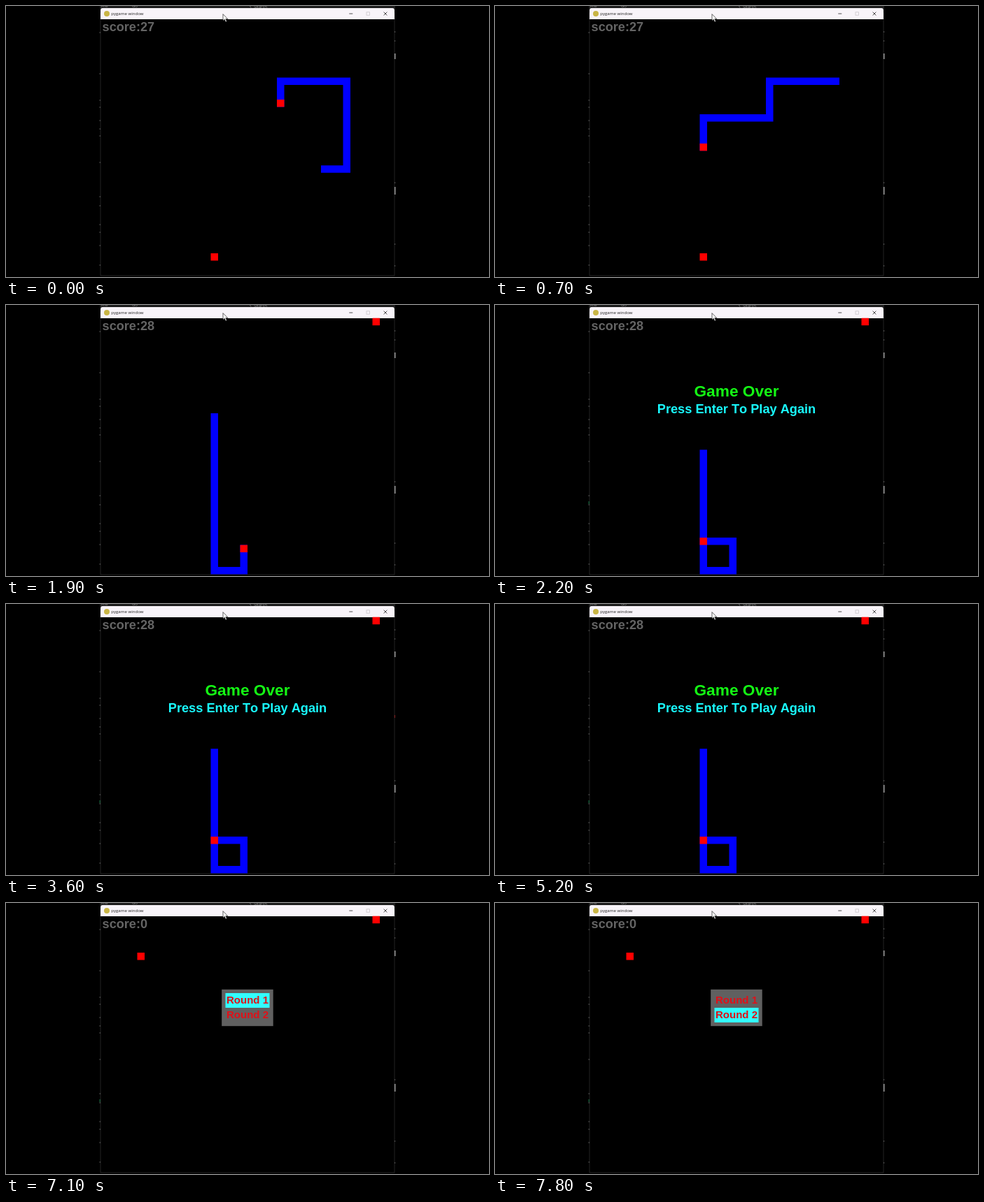
Animation, 690 px wide and 388 px high, one loop 8000 ms. Source, as an HTML page:

```html
<!DOCTYPE html>
<html lang="en">
<head>
<meta charset="utf-8">
<title>pygame window</title>
<style>
html, body { margin: 0; width: 100%; height: 100%; overflow: hidden; background: #000; }
svg { display: block; width: 690px; height: 388px; }
text { font-family: "Liberation Sans", Arial, sans-serif; font-weight: bold; font-kerning: none; }
.ui { font-family: "Open Sans", "Noto Sans", sans-serif; font-weight: normal; }
.mid { text-anchor: middle; }
</style>
</head>
<body>
<svg viewBox="0 0 690 388">
  <rect width="690" height="388"/>
  <rect x="134" width="422" height="4" fill="#1d1d1d"/>
  <g class="ui" fill="#8a8a8a" font-size="6">
    <text class="ui" x="354" y="3.2">Search</text>
    <text class="ui" x="136" y="2.4">File</text>
    <text class="ui" x="180" y="2.4">Go</text>
  </g>
  <path d="M348.5 0l1.5 2.5" stroke="#8a8a8a" stroke-width=".7"/>
  <g id="marks"></g>
  <rect x="555" y="68" width="1.3" height="8" fill="#eee"/>
  <rect x="555" y="259" width="1.3" height="11" fill="#eee"/>
  <rect id="redTick" x="555" y="159" width="1" height="4" fill="#c01818"/>
  <rect id="greenTick" x="133.7" y="281" width="1" height="4" fill="#159a58"/>

  <rect x="135" y="10" width="420" height="376" fill="#000" stroke="#2c2c2c" stroke-width=".8"/>
  <path d="M135 19V6q0-3 3-3H552q3 0 3 3V19Z" fill="#f8f4f9"/>
  <circle cx="144" cy="11" r="4" fill="#c8b545"/>
  <text class="ui" x="150.2" y="13.1" font-size="6.1" fill="#222">pygame window</text>
  <g fill="none" stroke="#222" stroke-width=".8">
    <path d="M490.3 11h5M539.6 8.6l4.8 4.8m0-4.8l-4.8 4.8"/>
    <rect x="515" y="8.8" width="4.4" height="4.4" stroke="#c9c5ca"/>
  </g>

  <g id="board"></g>
  <text id="score" x="137.6" y="36.4" font-size="18.1" fill="#646464"></text>

  <g id="over" class="mid">
    <text x="345" y="131" font-size="22.7" fill="#14fa14">Game Over</text>
    <text x="345" y="155" font-size="18.2" fill="#19faff">Press Enter To Play Again</text>
  </g>

  <g id="menu" class="mid">
    <rect x="308.2" y="123.8" width="73.5" height="52.4" fill="#606060"/>
    <rect id="pick" x="313.5" width="63" height="21" fill="#32fdff"/>
    <g font-size="15" fill="#e01018">
      <text x="345" y="144.3">Round 1</text>
      <text x="345" y="165.3">Round 2</text>
    </g>
  </g>

  <path d="M310 11.6v9.6l2.2-2 1.6 3.6 1.6-.7-1.6-3.5h3Z" fill="#fff" stroke="#222" stroke-width=".7"/>
</svg>
<script>
const LOOP = 8000, TICK = 100;
const CELL_W = 10.5, CELL_H = 10.48, LEFT = 135, TOP = 18.7;
const EAT_STEP = 30, OVER_AT = 2200, MENU_AT = 5600;
const RED = '#ff0000', BLUE = '#0000ff';
const $ = id => document.getElementById(id);

// Corners of the whole route, from the first tail cell to the crash.
const corners = [[30, 20], [33, 20], [33, 8], [24, 8], [24, 13], [15, 13],
                 [15, 34], [19, 34], [19, 30], [15, 30]];
const START = 27; // route index of the head at time zero
const route = [corners[0]];
for (const [cx, cy] of corners.slice(1)) {
  let [x, y] = route[route.length - 1];
  while (x !== cx || y !== cy) {
    x += Math.sign(cx - x);
    y += Math.sign(cy - y);
    route.push([x, y]);
  }
}

// Pace of the game: [tick, steps taken]
const pace = [[0, 0], [7, 15], [9, 18], [19, 39], [22, 44]];
function stepsAt(tick) {
  for (let i = 1; i < pace.length; i++) {
    const [t0, n0] = pace[i - 1], [t1, n1] = pace[i];
    if (tick <= t1) return Math.round(n0 + (n1 - n0) * (tick - t0) / (t1 - t0));
  }
  return pace[pace.length - 1][1];
}

const cell = ([x, y], fill) =>
  `<rect x="${LEFT + x * CELL_W}" y="${(TOP + y * CELL_H).toFixed(2)}" ` +
  `width="${CELL_W}" height="${CELL_H}" fill="${fill}"/>`;

// Adjoining cells are drawn as one stroke so that no seams show.
function snake(cells) {
  const d = cells.map(([x, y]) =>
    `${LEFT + (x + .5) * CELL_W} ${(TOP + (y + .5) * CELL_H).toFixed(2)}`).join('L');
  return `<path d="M${d}" fill="none" stroke="${BLUE}" stroke-width="10.5" stroke-linecap="square"/>` +
    cell(cells[cells.length - 1], RED);
}

// Slivers of the window behind, along both edges.
const sliver = x => y =>
  `<rect x="${x}" y="${y}" width=".9" height="2" fill="#777"/>`;
$('marks').innerHTML =
  [37, 96, 134, 144, 163, 175, 185, 223, 272, 285, 312, 323, 342, 370].map(sliver(133.8)).join('') +
  [36, 49, 252, 340, 371].map(sliver(555.2)).join('');

const show = (id, on) => $(id).setAttribute('visibility', on ? 'visible' : 'hidden');

function draw(time) {
  const t = Math.floor(time / TICK) * TICK;
  const steps = stepsAt(t / TICK);
  const fed = steps >= EAT_STEP;
  const menu = t >= MENU_AT;

  let html = cell(fed ? [37, 0] : [15, 32], RED);
  if (menu) {
    html += cell([5, 5], RED);
  } else {
    const head = START + steps;
    html += snake(route.slice(head - (fed ? 28 : 27), head + 1));
  }
  $('board').innerHTML = html;
  $('score').textContent = 'score:' + (menu ? 0 : fed ? 28 : 27);

  const first = (t >= 6400 && t < 6600) || (t >= 7100 && t < 7500);
  $('pick').setAttribute('y', first ? 129 : 150);
  show('over', t >= OVER_AT && !menu);
  show('menu', menu);
  show('redTick', t >= 2700 && t < 5000);
  show('greenTick', t >= OVER_AT);
}

function frame() {
  draw(performance.now() % LOOP);
  requestAnimationFrame(frame);
}
frame();
</script>
</body>
</html>
```
